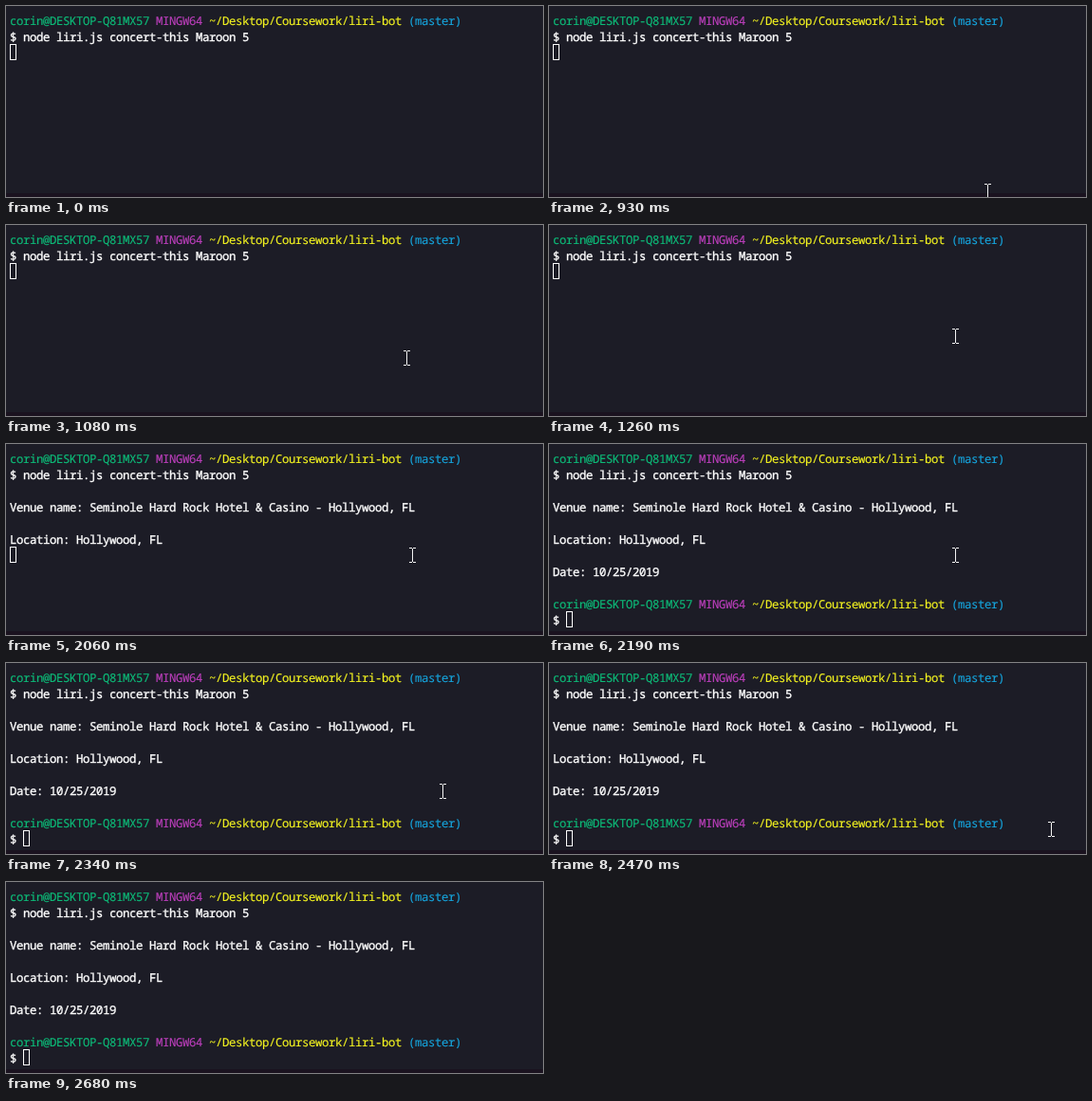
Animation, 566 px wide and 201 px high, one loop 3270 ms. Source, as an HTML page with a canvas:

```html
<!DOCTYPE html>
<html lang="en">
<head>
<meta charset="utf-8">
<title>Terminal</title>
<style>
  html, body { margin: 0; width: 566px; height: 201px; overflow: hidden; background: #1c1c26; }
  body { position: relative; }
  #strip { position: absolute; left: 0; top: 197px; width: 566px; height: 4px; background: #1a121f; }
  #term div {
    position: absolute; left: 4px; height: 17px; white-space: pre; color: #fff;
    font: 500 12.3px/17px "Noto Sans Mono", "DejaVu Sans Mono", monospace;
    letter-spacing: calc(7px - 0.6em); -webkit-text-stroke: 0.35px;
    font-variant-ligatures: none; text-rendering: geometricPrecision;
  }
  #term .user { color: #0dbc79; }
  #term .sys { color: #bc3fbc; }
  #term .path { color: #f5f520; }
  #term .branch { color: #16a4dc; }
  #term .user, #term .sys, #term .path, #term .branch { -webkit-text-stroke-width: 0.15px; }
  canvas { position: absolute; left: 0; top: 0; }
</style>
</head>
<body>
<div id="strip"></div>
<div id="term"></div>
<canvas id="view" width="566" height="201"></canvas>
<script>
const LOOP = 3270, TOP = 6, ROW = 17, CELL = 7, LEFT = 4;
const term = document.getElementById('term');
const ctx = document.getElementById('view').getContext('2d');

const prompt = [
  ['user', 'corin@DESKTOP-Q81MX57 '], ['sys', 'MINGW64 '],
  ['path', '~/Desktop/Coursework/liri-bot '], ['branch', '(master)']
];
const plain = text => [['', text]];

// row, time it appears, coloured parts
const lines = [
  [0, 0, prompt],
  [1, 0, plain('$ node liri.js concert-this Maroon 5')],
  [3, 2060, plain('Venue name: Seminole Hard Rock Hotel & Casino - Hollywood, FL')],
  [5, 2060, plain('Location: Hollywood, FL')],
  [7, 2100, plain('Date: 10/25/2019')],
  [9, 2190, prompt],
  [10, 2190, plain('$ ')]
].map(([row, at, parts]) => {
  const el = document.createElement('div');
  el.style.top = TOP + 1 + row * ROW + 'px';
  for (const [name, text] of parts) {
    const span = document.createElement('span');
    span.className = name;
    span.textContent = text;
    el.append(span);
  }
  term.append(el);
  return { el, at };
});

// time, column, row of the block cursor
const blocks = [[0, 0, 2], [2060, 0, 6], [2100, 0, 8], [2190, 2, 10]];

const easeOut = p => 1 - (1 - p) ** 2;
const smooth = p => p * p * (3 - 2 * p);
const mix = (a, b, p) => a + (b - a) * p;

// position of the mouse pointer, or null while it is outside
function pointer(t) {
  if (t < 930 || t >= 2680) return null;
  if (t < 1260) {
    const p = easeOut(Math.floor((t - 930) / 30) / 11);
    return [mix(462, 428, p) - 20 * Math.sin(Math.PI * p), mix(195, 117, p)];
  }
  if (t < 2260) return [428, 117];
  if (t < 2510) {
    const p = smooth(Math.min(1, (Math.floor((t - 2260) / 30) + 1) / 8));
    return [mix(428, 529, p), mix(117, 175, p)];
  }
  if (t < 2610) return [531, 181];
  return t < 2640 ? [534, 187] : [536, 192];
}

function drawBlock(col, row) {
  ctx.strokeStyle = '#fff';
  ctx.lineWidth = 1;
  ctx.strokeRect(LEFT + col * CELL + 0.5, TOP + row * ROW + 0.5, CELL - 1, ROW - 1);
}

function drawBeam(x, y) {
  x = Math.round(x);
  y = Math.round(y);
  ctx.fillStyle = '#f4f4f4';
  for (const edge of [y - 8, y + 7]) {
    ctx.fillRect(x - 3, edge, 3, 1);
    ctx.fillRect(x + 1, edge, 3, 1);
  }
  ctx.fillRect(x, y - 7, 1, 14);
}

function draw(t) {
  for (const { el, at } of lines) el.style.visibility = t >= at ? 'visible' : 'hidden';
  ctx.clearRect(0, 0, 566, 201);
  const [, col, row] = blocks.filter(b => t >= b[0]).pop();
  drawBlock(col, row);
  const pos = pointer(t);
  if (pos) drawBeam(...pos);
}

const start = performance.now();
function tick() {
  draw((performance.now() - start) % LOOP);
  requestAnimationFrame(tick);
}
tick();
</script>
</body>
</html>
```
